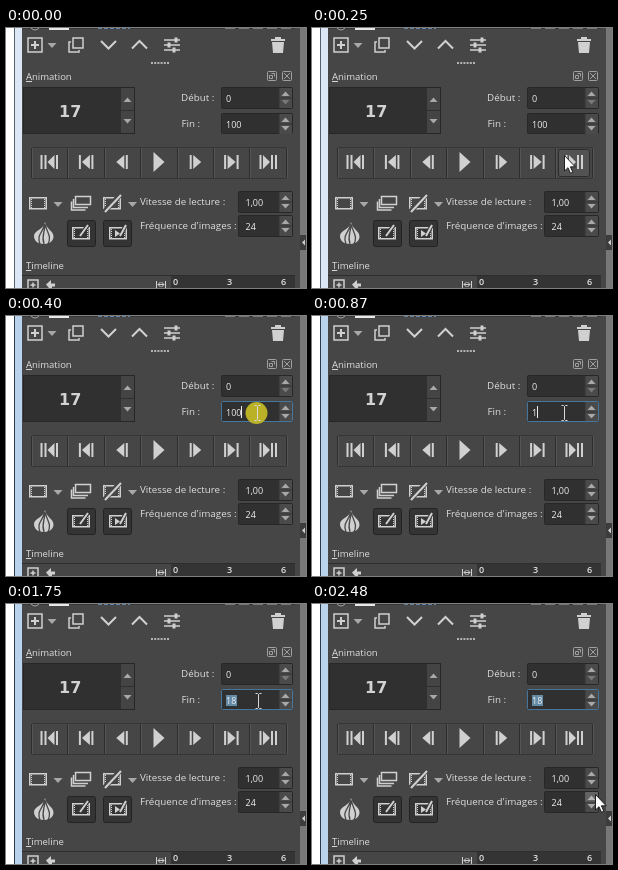
Recreate the animation shown at these times as an HTML page. Size 300x260 px, loop 2530 ms.

```html
<!DOCTYPE html>
<html lang="fr">
<head>
<meta charset="utf-8">
<title>Animation</title>
<style>
html, body { margin: 0; width: 100%; height: 100%; overflow: hidden; background: #fff; }
svg { display: block; width: 300px; height: 260px; }
text { font: 9.5px "Open Sans", "Noto Sans", sans-serif; fill: #dedede; white-space: pre; }
.label { font-size: 9.8px; }
.num { font-size: 9px; fill: #f0f0f0; }
.big { font: 700 16px "DejaVu Sans", sans-serif; fill: #d2d2d2; }
.rule { font-size: 9px; font-weight: 600; fill: #e4e4e4; }
.key { text-decoration: underline; }
.line { fill: none; stroke: #d0d0d0; stroke-width: 1.5; }
.thin { fill: none; stroke: #a0a0a0; stroke-width: 1; }
.ico { fill: #d0d0d0; }
.field { fill: #303030; stroke: #272727; }
.press { fill: #343434; stroke: #232323; }
.mark { fill: #a8a8a8; }
</style>
</head>
<body>
<svg viewBox="0 0 300 260">
  <defs>
    <g id="spin">
      <rect width="13" height="20" fill="#4a4a4a"/>
      <path d="M0 10H13M0 0V20" stroke="#343434"/>
      <path d="M2.500 8L6.500 3.500L10.500 8ZM2.500 12L6.500 16.500L10.500 12Z"/>
    </g>
    <path id="drop" class="mark" d="M-4.5 -2H4.5L0 3Z"/>
    <g id="film">
      <rect x=".75" y=".75" width="16.500" height="11" fill="none" stroke="#d0d0d0" stroke-width="1.5"/>
      <path d="M2.500 2V11M15.500 2V11" stroke="#d0d0d0" stroke-dasharray="1 1"/>
    </g>
  </defs>

  <rect width="300" height="260" fill="#fff"/>
  <rect id="frame" x="9" width="7" height="260"/>
  <rect id="edge" x="8" width="1" height="260"/>
  <rect x="16" width="284" height="260" fill="#464646"/>

  <!-- strip of the panel above -->
  <path d="M16 .5H289" stroke="#383838"/>
  <rect x="43" width="20" height="2" fill="#e8e8e8"/>
  <path d="M25 0Q29 4 33 0" class="thin"/>
  <path d="M92 .5H124" stroke="#5b83a8" stroke-dasharray="4 2"/>
  <path d="M219 .5H286" stroke="#777" stroke-dasharray="10 4"/>

  <!-- layer toolbar -->
  <g class="line">
    <rect x="22" y="10" width="14" height="14"/>
    <path d="M25 17H33M29 13V21" stroke-width="2"/>
    <rect x="67" y="10" width="10" height="10"/>
    <path d="M65 14H63V24H73V22"/>
    <path d="M95 13L102.500 20.500L110 13M126 20.500L133.500 13L141 20.500" stroke-width="2"/>
    <path d="M158 12H174M158 17H174M158 22H174"/>
    <path d="M170 9.500V14.500M163 14.500V19.500M168 19.500V24.500" stroke-width="3"/>
  </g>
  <use href="#drop" x="46" y="17"/>
  <path class="ico" d="M265 11H269V9H275V11H279V13H265ZM266 14H278L277 25H267Z"/>
  <path d="M145 35H163" stroke="#b4b4b4" stroke-width="2" stroke-dasharray="2 1.200"/>

  <!-- animation dock -->
  <text x="20" y="52"><tspan class="key">A</tspan>nimation</text>
  <g class="thin">
    <rect x="261.500" y="43.500" width="9" height="9" rx="1"/>
    <path d="M263.500 47.500H266.500V50.500H263.500ZM265.500 45.500H268.500V48.500"/>
    <rect x="276.500" y="43.500" width="9" height="9" rx="1"/>
    <path d="M278 45L284 51M284 45L278 51"/>
  </g>
  <rect class="field" x="17.500" y="59.500" width="111" height="46"/>
  <rect x="115" y="60" width="13" height="45" fill="#444"/>
  <path d="M115 82.500H128" stroke="#303030"/>
  <path class="mark" d="M117.500 74L121.500 69.500L125.500 74ZM117.500 91L121.500 95.500L125.500 91Z"/>
  <text class="big" x="53" y="88.500">17</text>

  <text class="label" x="175" y="73">Début :</text>
  <text class="label" x="175.500" y="99">Fin :</text>
  <text class="label" x="134" y="177">Vitesse de lecture :</text>
  <text class="label" x="134" y="201">Fréquence d'images :</text>
  <rect class="field" x="215.500" y="59.500" width="71" height="21" rx="1"/>
  <rect class="field" x="215.500" y="85.500" width="71" height="20" rx="1"/>
  <rect class="field" x="232.500" y="163.500" width="54" height="21" rx="1"/>
  <rect class="field" x="232.500" y="187.500" width="54" height="21" rx="1"/>
  <g class="mark">
    <use href="#spin" x="273" y="60"/>
    <use href="#spin" x="273" y="86" id="finSpin"/>
    <use href="#spin" x="273" y="164"/>
    <use href="#spin" x="273" y="188"/>
  </g>
  <rect x="274" y="71" width="12" height="9" fill="#4a4a4a" opacity=".5"/>
  <rect id="focus" x="215.500" y="85.500" width="71" height="20" rx="1" fill="none" stroke="#47769c"/>
  <rect id="rateHover" x="273" y="188" width="13" height="10" fill="#fff" opacity=".14"/>
  <text class="num" x="220" y="74">0</text>
  <text class="num" x="239.500" y="178">1,00</text>
  <text class="num" x="239.500" y="202">24</text>
  <rect id="sel" x="220" y="91" width="11" height="11" fill="#648ba6"/>
  <text class="num" id="fin" x="220" y="100"></text>
  <rect id="caret" y="90" width="1" height="12" fill="#f0f0f0"/>

  <!-- transport -->
  <g id="bar"></g>
  <rect id="btnHover" x="246.500" y="121.500" width="31" height="27" rx="2" fill="#535353" stroke="#2c2c2c"/>
  <g id="keys" class="ico"></g>

  <!-- frame tools -->
  <use href="#film" x="23" y="169"/>
  <use href="#film" x="97" y="169"/>
  <g class="line">
    <rect x="69.500" y="168.500" width="15" height="8"/>
    <path d="M67.500 171V179.500H82M65.500 173.500V182H79.500"/>
    <path d="M98 184L114 167" stroke="#464646" stroke-width="5"/>
    <path d="M99 184L115 167" stroke-width="2"/>
  </g>
  <use href="#drop" x="52" y="176"/>
  <use href="#drop" x="126.500" y="176"/>
  <path class="ico" d="M39 194C40 201 48 203 47.500 209C47 214 42 216 38 216C32 216 28 213 28 208C28 202 38 202 39 194Z"/>
  <path d="M38.500 196C38 204 30 206 34 216M39 196C39 205 35 207 38 216M39.500 197C41 205 46 208 42 216" fill="none" stroke="#464646" stroke-width="1.300"/>
  <rect class="press" x="61.500" y="192.500" width="28" height="26" rx="2"/>
  <rect class="press" x="97.500" y="192.500" width="28" height="26" rx="2"/>
  <use href="#film" x="66" y="199"/>
  <use href="#film" x="103" y="199"/>
  <g class="line">
    <path d="M74 208L82 197M114 208L120 197" stroke="#343434" stroke-width="4"/>
    <path d="M74 208L82 197M114 208L120 197" stroke-width="2"/>
  </g>
  <path class="ico" d="M109 202L114 205.500L109 209Z"/>

  <!-- timeline dock -->
  <text x="20" y="241"><tspan class="key">T</tspan>imeline</text>
  <rect x="16" y="247" width="273" height="1" fill="#2d2d2d"/>
  <rect x="165" y="248" width="124" height="12" fill="#343434"/>
  <g class="line">
    <rect x="22" y="252" width="10" height="10"/>
    <path d="M24.500 257H29.500M27 254.500V259.500"/>
    <path d="M150.500 253V260M159.500 253V260M152 256.500H158M154.500 254L152 256.500L154.500 259M155.500 254L158 256.500L155.500 259" stroke-width="1"/>
  </g>
  <path class="ico" d="M40 256.500L45 252V255.500H49V258.500H46V260H43Z"/>
  <text class="rule" x="167" y="257">0</text>
  <text class="rule" x="221" y="257">3</text>
  <text class="rule" x="275" y="257">6</text>

  <!-- right border -->
  <rect x="294" width="6" height="260" fill="#777"/>
  <rect x="294" y="207" width="6" height="15" fill="#3c3c3c"/>
  <path class="ico" d="M296 214.500L299 211.500V217.500Z"/>

  <circle id="click" cx="250.500" cy="97" r="11" fill="#c2b926" opacity=".94"/>
  <path id="beam" d="M-3 -7.500H-1L0 -6.500L1 -7.500H3M0 -6.500V6.500M-3 7.500H-1L0 6.500L1 7.500H3" fill="none" stroke="#d8d8d8"/>
  <path id="arrow" d="M.5 .5V16L4 12.700L6.400 18.200L8.800 17.200L6.400 11.800H11.200Z" fill="#fff" stroke="#111" stroke-width=".9"/>
</svg>
<script>
const LOOP = 2530;
const el = id => document.getElementById(id);
const show = (id, on) => { el(id).style.display = on ? '' : 'none'; };
const set = (id, attrs) => { for (const k in attrs) el(id).setAttribute(k, attrs[k]); };

// Transport row: seven cells, glyphs mirrored around the play button
const pitch = 36.4;
let bar = '<path d="M26 119.500H280M26 150.500H280" stroke="#363636"/>';
for (let i = 0; i < 8; i++) {
  const x = Math.round(25 + i * pitch) + 0.5;
  bar += `<path d="M${x} 120V150" stroke="#2e2e2e"/><path d="M${x + 1} 120V150" stroke="#555"/>`;
}
el('bar').innerHTML = bar;

const glyphs = [
  'M-9 -7h2v14h-2zM-5 -7h2v14h-2zM5 -7V7L-2 0ZM6.500 -7h2v14h-2z',
  'M-7 -7h2v14h-2zM4 -7V7L-4 0ZM5.500 -7h2v14h-2z',
  'M2 -7V7L-6 0ZM3.500 -7h2v14h-2z'
];
const glyph = (d, x, flip) => `<path d="${d}" transform="translate(${x} 134) scale(${flip} 1)"/>`;
el('keys').innerHTML = glyph('M-5 -10V10L6 0Z', 152.5, 1) +
  glyphs.map((d, i) => glyph(d, 43.5 + i * pitch, 1) + glyph(d, 262 - i * pitch, -1)).join('');

// Content of the end field: time, text, caret position (0 = hidden), selected
const edits = [
  [0, '100', 0, 0], [400, '100', 235, 0],
  [780, '10', 230, 0], [870, '1', 225, 0], [1060, '', 220, 0],
  [1290, '1', 225, 0], [1380, '18', 230, 0],
  [1750, '18', 0, 1], [1890, '18', 220, 1], [2120, '18', 0, 1]
];

// Pointer: time, shape, x, y
const moves = [
  [0, '', 0, 0], [50, 'arrow', 264, 241], [100, 'arrow', 261, 214],
  [150, 'arrow', 258, 184], [200, 'arrow', 255, 154], [250, 'arrow', 252, 127],
  [300, 'arrow', 251, 110], [350, 'beam', 250.5, 99], [400, 'beam', 251.5, 97],
  [590, 'beam', 252.5, 97], [2300, 'arrow', 253, 107], [2350, 'arrow', 259, 128],
  [2390, 'arrow', 268, 156], [2440, 'arrow', 278, 180], [2480, 'arrow', 283, 190]
];

const at = (steps, t) => steps.findLast(s => s[0] <= t);

function draw(t) {
  const [, value, caret, picked] = at(edits, t);
  const [, shape, x, y] = at(moves, t);
  const active = t >= 400;

  el('fin').textContent = value;
  show('sel', picked);
  show('caret', caret);
  set('caret', { x: caret });
  set('finSpin', { opacity: value ? 1 : 0.55 });

  show('focus', active);
  set('frame', { fill: active ? '#bad3ed' : '#dbe7f4' });
  set('edge', { fill: active ? '#2c3b48' : '#56616b' });

  show('btnHover', t >= 250 && t < 300);
  show('rateHover', t >= 2480);
  show('click', t >= 400 && t < 500);
  for (const id of ['arrow', 'beam']) {
    show(id, id === shape);
    set(id, { transform: `translate(${x} ${y})` });
  }
}

const start = performance.now();
function tick() {
  draw((performance.now() - start) % LOOP);
  requestAnimationFrame(tick);
}
tick();
</script>
</body>
</html>
```
